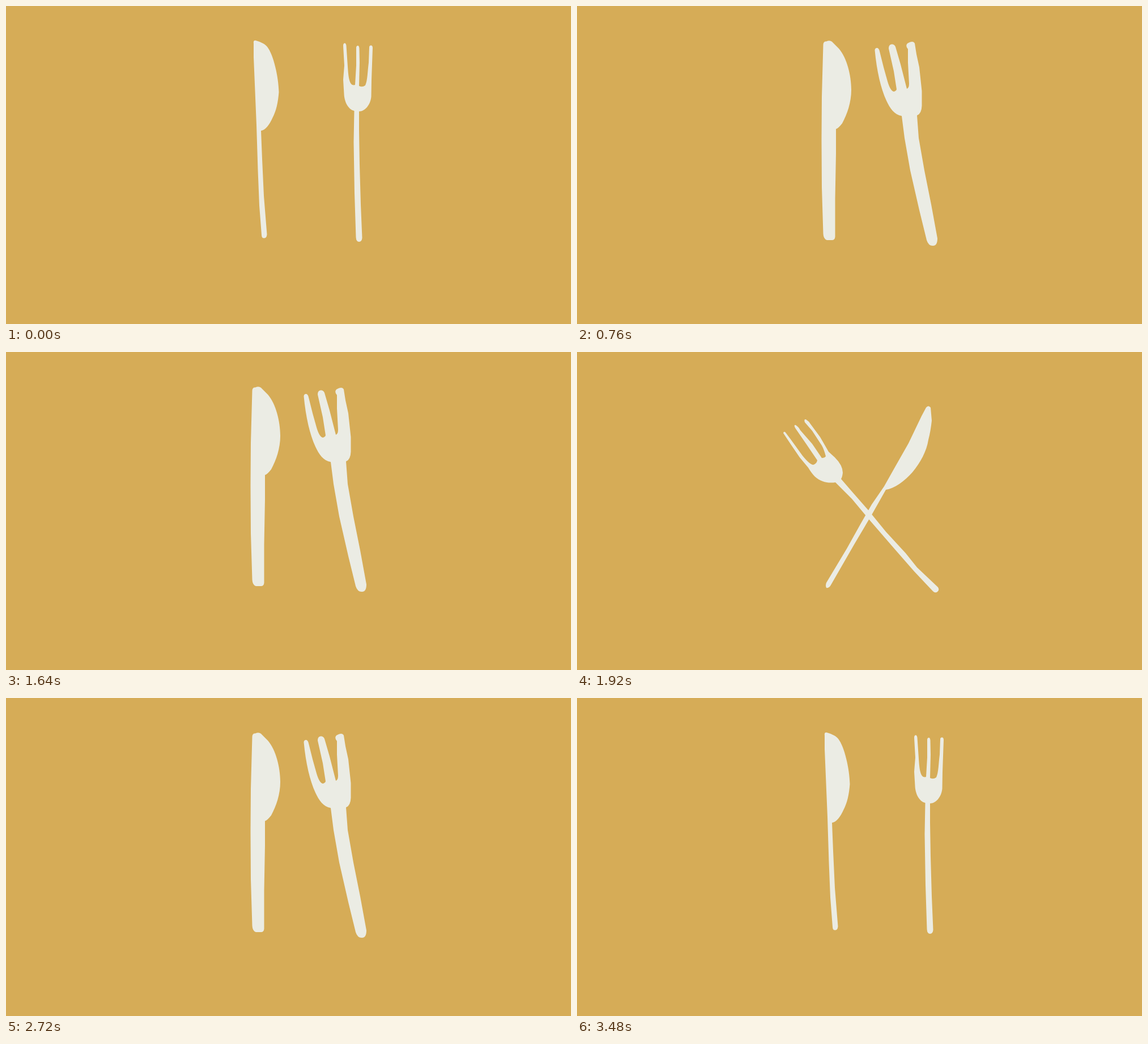
Animation, 997 px wide and 561 px high, one loop 3.52 s. Source, as an HTML page:

```html
<!DOCTYPE html>
<html lang="en">
<head>
<meta charset="utf-8">
<title>Knife and fork</title>
<style>
html, body { margin: 0; width: 100%; height: 100%; overflow: hidden; background: #d6ac57; }
svg { display: block; width: 100%; height: 100%; fill: #ebece4; }
g { display: none; }
g.on { display: inline; }
</style>
</head>
<body>
<svg viewBox="0 0 997 561">
  <g id="thin">
    <path id="knife" d="M437 66Q436 60 441 61C447 63 455 65 461 72C472 86 481 125 481.5 152C480 170 477 185 470 198C465 209 458 219 450 220L452 270L455 335L460.500 403Q460 409 456 409.500Q451 410 451 404L447 352L444.500 290L442 210L437 90Z"/>
    <path id="fork" d="M595 70Q595 65.500 598 65.500Q600 66 600.500 70L603 107C604 122 605 130 608 136Q611 141 616 139L618 105L618 74Q618 70 621 70Q623 70 623.500 75L624 100L623 141Q629 144 634 140C638 132 638 115 640 100L641 73Q641 69.500 644 69.500Q647 69.500 647 74L645 130L644.500 160C643 175 633 186 623 186L623 220L624 280L626 350L628.500 409Q628 416 623 416Q618 416 617.500 408L615 330L613.500 240L614.500 185C603 182 597 168 596.500 155L595 130L597 105Z"/>
  </g>
  <g id="cross">
    <path d="M617 100Q620 93 623 97Q625 105 624 140C624 160 619 180 609 195C595 217 580 233 563 240Q550 245 542 246L519 290L503 322L480 362L450 411Q447 416 443 414Q441 411 444 406L469 362L498 310L511 285L525 260L542 230L580 166Z"/>
    <path d="M365 145Q366 142 369 144Q373 147 375 152L400 183Q412 195 419 195Q424 192 422 188L410 174L394 148L384 133Q382 128 386 129Q389 131 391 135L414 163L427 181Q432 185 435 181Q436 176 434 171L420 148L402 125Q399 119 403 120Q409 123 412 128L432 155Q441 171 452 180C463 189 470 200 470 212Q469 222 465 226L494 260L516 286L560 333L588 367L634 413Q637 417 635 421Q631 425 626 421L602 397L578 369L540 323L516 295L487 263L459 231C448 233 434 232 422 224C411 215 404 203 399 193L378 166Z"/>
  </g>
  <g id="thick">
    <path d="M434.500 68Q435 62 440 62.500Q446 60 450 63L462 75C476 91 484 122 484 148C484 170 477 190 468 207Q461 216 457 217L457 260L455.500 340L455.500 407Q455 413 450 413L441 413Q435 411 434.500 402L432 320L431.500 235L432 160Z"/>
    <path d="M525.500 78Q526 73.500 530 74Q533 75 534 80L541 108L548 133Q553 150 559 151Q563 150 564 147L559 115L550 75Q550 68 555 67.500Q560 67 562 72L571 103L582 146Q586 145 586 137L584 100L584 76Q579 70 583 66Q593 60 596 66L599 85L604 108L608.500 150L608.500 176Q608 190 600 193L603 233L613 290L625 350L636 410Q636 423 628 423Q620 423 617 413L604 360L588 290L578 233L573 194C560 192 552 180 546 167C536 145 529 115 525.500 78Z"/>
  </g>
  <g id="thinAlt">
    <use href="#knife" x="-1" y="-1"/>
    <use href="#fork" x="4" y="-1"/>
  </g>
  <g id="crossAlt">
    <path d="M616 98Q620 93 624 98L626 121Q624 140 620 155C617 175 606 195 592 212C578 228 560 241 545 243L519 289L490 338L448 411Q445 417 440 416Q438 412 440 407L476 347L500 304L520 269L542 237L560 205L585 161L608 113Z"/>
    <path d="M364 143Q365 139 368 142L377 154L398 183Q411 199 417 199Q423 197 424 191L405 163L385 134Q382 128 386 129Q391 132 394 138L415 162L432 187Q437 187 439 184Q436 172 432 165L415 139L402 124Q400 118 404 119Q409 122 412 127L429 150L444 176L455 186Q469 200 469 213Q468 221 466 224L485 246L514 279L545 317L580 355L600 380L637 415Q640 420 636 423Q632 426 628 422L595 387L560 347L515 295L485 259L456 230C443 232 430 229 420 220Q414 214 408 204L393 186L378 164Z"/>
  </g>
</svg>
<script>
const LOOP = 3520, TICK = 40;
const poses = [...document.querySelectorAll('g')];
const start = performance.now();

// Poses run forth and back; two ticks out of every 22 are held.
function poseAt(ms) {
  const tick = Math.floor(ms / TICK);
  const step = tick - 2 * Math.floor(tick / 22) - (tick % 22 >= 15 ? 1 : 0);
  return 4 - Math.abs(4 - step % 8);
}

function draw(now) {
  const current = poseAt(Math.max(0, now - start) % LOOP);
  poses.forEach((pose, i) => pose.classList.toggle('on', i === current));
  requestAnimationFrame(draw);
}
draw(start);
</script>
</body>
</html>
```
